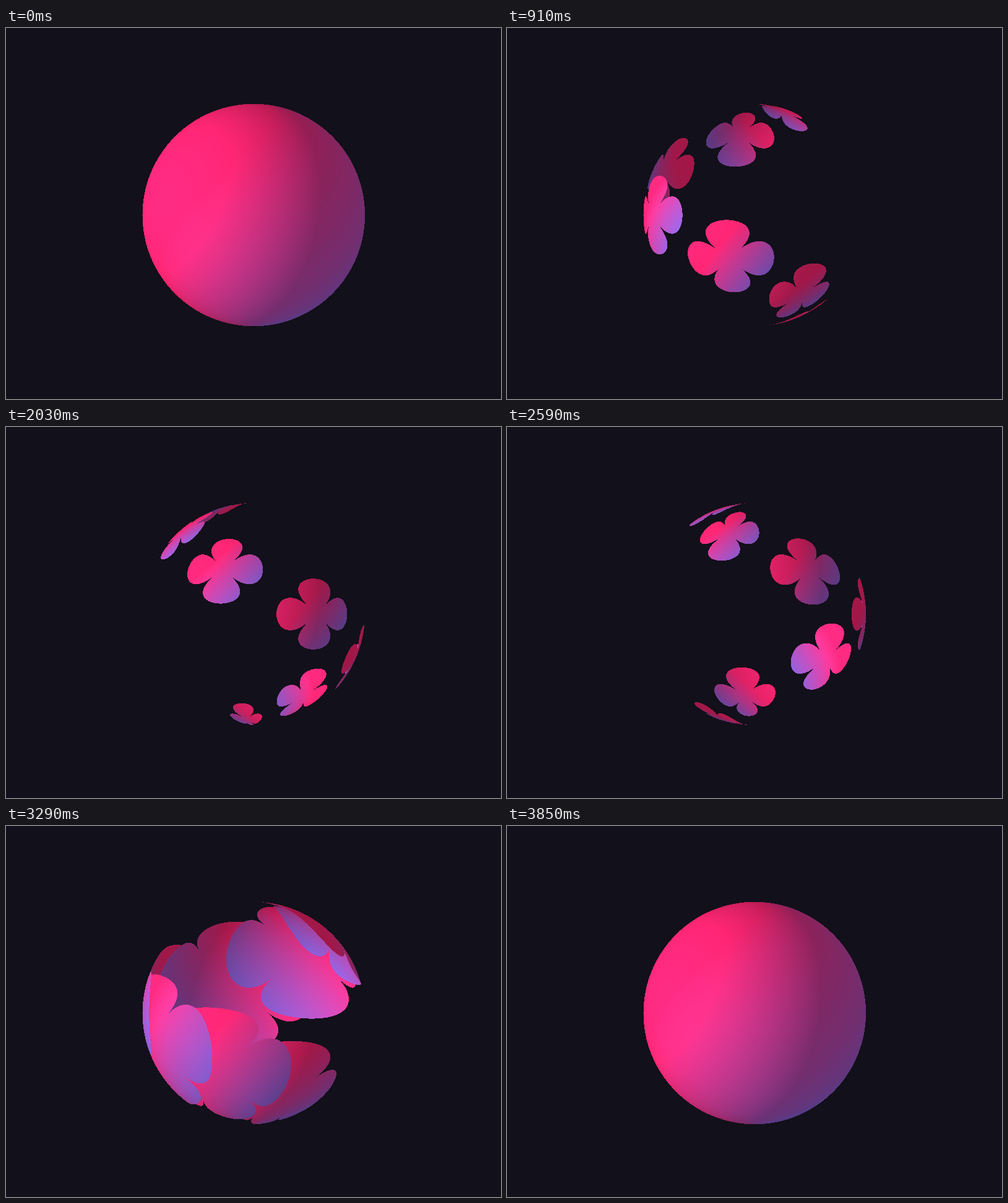
Write an HTML page with a canvas that moves like this. It is 800 px wide and 600 px high and loops after 3.92 s.

```html
<!DOCTYPE html>
<html lang="en">
<head>
<meta charset="utf-8">
<title>Blooming sphere</title>
<style>
  html, body { margin: 0; width: 100%; height: 100%; overflow: hidden; background: #12101a; }
  canvas { display: block; }
</style>
</head>
<body>
<canvas id="stage" width="800" height="600"></canvas>
<script>
const LOOP = 3920, STEP = 70, COUNT = 7;
const CX = 400.3, CY = 302.5, RADIUS = 179.8;
const LEFT = 220, TOP = 122, SIZE = 362;
const DEG = 180 / Math.PI;
const PINK = [255, 38, 115], PURPLE = [136, 95, 214], BACK = [18, 16, 26];
const LIGHT = [-0.8, 0.15, 0.58];

const ctx = document.getElementById('stage').getContext('2d');
ctx.fillStyle = '#12101a';
ctx.fillRect(0, 0, 800, 600);
const image = ctx.createImageData(SIZE, SIZE);

const mix = (a, b, t) => a + (b - a) * t;
const clamp = v => Math.min(1, Math.max(0, v));
const shade = (x, y, z) =>
  0.63 + 0.52 * Math.max(0, x * LIGHT[0] + y * LIGHT[1] + z * LIGHT[2]);

// Both surface points behind each pixel; the far one is seen from inside.
const pixels = [];
for (let row = 0; row < SIZE; row++) {
  for (let col = 0; col < SIZE; col++) {
    const x = (LEFT + col + 0.5 - CX) / RADIUS;
    const y = (CY - TOP - row - 0.5) / RADIUS;
    const zz = 1 - x * x - y * y;
    const at = (row * SIZE + col) * 4;
    image.data.set([...BACK, 255], at);
    if (zz < 0) continue;
    const z = Math.sqrt(zz), lat = Math.asin(y) * DEG;
    pixels.push({ at, lat, hits: [
      { lon: Math.atan2(x, z) * DEG, light: shade(x, y, z) },
      { lon: Math.atan2(x, -z) * DEG, light: shade(-x, -y, z) }
    ] });
  }
}

function poseAt(time) {
  const phase = 2 * Math.PI * time / LOOP;
  const bloom = 2 ** (5 * (Math.cos(phase + 0.112) - 1));
  const turn = -161 + 2 * phase * DEG + 82 * Math.sin(phase + 0.152);
  const lonGap = mix(52, 32, bloom), latGap = mix(24, 0, bloom);
  return {
    notch: mix(0.25, 1, bloom),
    halfLon: mix(22.6, 118, bloom),
    halfLat: mix(18.5, 90, bloom),
    flowers: Array.from({ length: COUNT }, (_, i) => ({
      lon: turn - i * lonGap, lat: (i - 3) * latGap
    })).reverse()
  };
}

// Four petals, each a cubic curve running from notch to notch.
function insideFlower(x, y, notch) {
  const along = Math.max(Math.abs(x), Math.abs(y));
  const across = Math.min(Math.abs(x), Math.abs(y));
  if (along > 1) return false;
  if (along <= notch) return true;
  const q = Math.sqrt((1 - along) / (1 - notch));
  return across <= q * (notch + (3.33 - notch) * (1 - q * q) / 4);
}

// Pink to purple position of the topmost flower, or -1 where there is none.
function tintAt(lon, lat, pose) {
  for (const flower of pose.flowers) {
    const y = (lat - flower.lat) / pose.halfLat;
    if (y > 1 || y < -1) continue;
    const turns = (lon - flower.lon) / 360;
    const x = (turns - Math.round(turns)) * 360 / pose.halfLon;
    if (insideFlower(x, y, pose.notch)) return clamp(0.28 + 0.58 * x - 0.46 * y);
  }
  return -1;
}

function draw(time) {
  const pose = poseAt(time), data = image.data;
  for (const { at, lat, hits } of pixels) {
    let hit = hits[0], tint = tintAt(hit.lon, lat, pose);
    if (tint < 0) {
      hit = hits[1];
      tint = tintAt(hit.lon, lat, pose);
    }
    for (let c = 0; c < 3; c++) {
      data[at + c] = tint < 0 ? BACK[c] : mix(PINK[c], PURPLE[c], tint) * hit.light;
    }
  }
  ctx.putImageData(image, LEFT, TOP);
}

const start = performance.now();
let shown = -1;
function tick() {
  const time = Math.floor((performance.now() - start) % LOOP / STEP) * STEP;
  if (time !== shown) draw(shown = time);
  requestAnimationFrame(tick);
}
tick();
</script>
</body>
</html>
```
